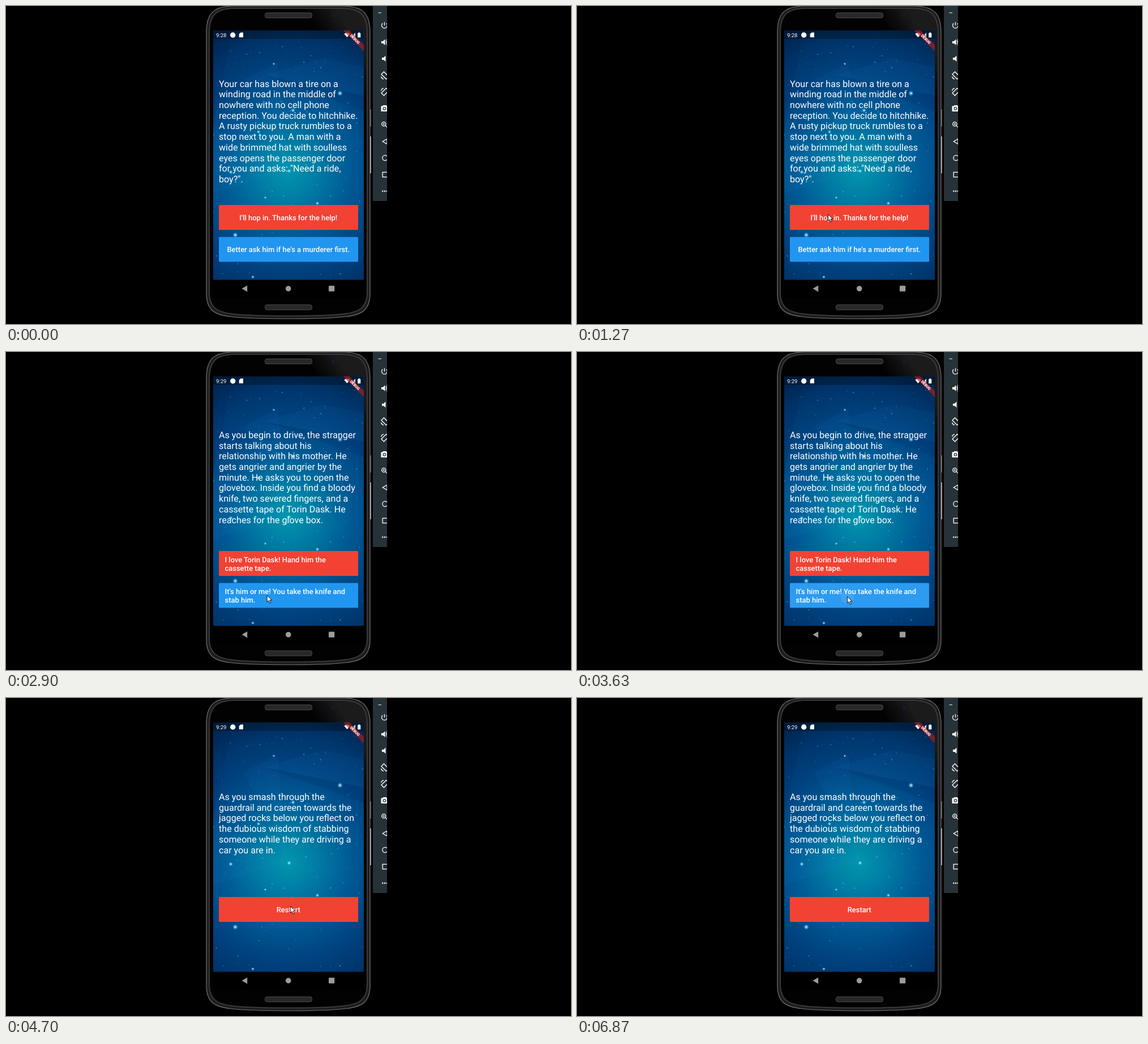
Animation, 998 px wide and 561 px high, one loop 7730 ms. Source, as an HTML page:

```html
<!DOCTYPE html>
<html lang="en">
<head>
<meta charset="utf-8">
<title>Hitchhiker story</title>
<style>
  html, body { margin: 0; width: 100%; height: 100%; overflow: hidden; background: #000; }
  svg { display: block; width: 100vw; height: 100vh; }
  text { font-family: Roboto, Arial, sans-serif; fill: #fff; text-rendering: geometricPrecision; }
  .story { font-size: 16.1px; }
  .label { font-size: 12.93px; font-weight: 500; }
  .mid { text-anchor: middle; }
  .clock { font-size: 9.5px; }
  .banner { font-size: 6.6px; font-weight: 900; }
  .red { fill: #f24233; }
  .blue { fill: #2196f0; }
  .icon { fill: none; stroke: #fff; stroke-width: 1.3; }
  .solid { fill: #fff; }

  .s1, .s2, .s3, .am, .pm, .press { animation: 7.73s step-end infinite; }
  .s1 { animation-name: first; }
  .s2 { animation-name: second; }
  .s3 { animation-name: third; }
  .am { animation-name: before; }
  .pm { animation-name: after; }
  .press { animation-name: press; }
  .splash { animation: splash 7.73s linear infinite; transform-box: fill-box; transform-origin: center; }
  .cursor { animation: cursor 7.73s step-end infinite; }

  /* 1830 ms: second screen, 3770 ms: third screen */
  @keyframes first { 0% { visibility: visible } 23.67%, 100% { visibility: hidden } }
  @keyframes second {
    0% { visibility: hidden } 23.67% { visibility: visible } 48.77%, 100% { visibility: hidden }
  }
  @keyframes third { 0% { visibility: hidden } 48.77%, 100% { visibility: visible } }
  @keyframes before { 0% { visibility: visible } 36.22%, 100% { visibility: hidden } }
  @keyframes after { 0% { visibility: hidden } 36.22%, 100% { visibility: visible } }
  @keyframes press { 0% { visibility: hidden } 46.9% { visibility: visible } 48.77%, 100% { visibility: hidden } }
  @keyframes splash {
    0%, 20.69% { opacity: 0; transform: scale(.1) }
    20.7% { opacity: .2; transform: scale(.1) }
    23.67% { opacity: .16; transform: scale(.8) }
    26.3% { opacity: .02; transform: scale(1) }
    28.8%, 100% { opacity: 0; transform: scale(1) }
  }
  @keyframes cursor {
    0% { opacity: 0; transform: translate(376px, 410px) }
    11.64% { opacity: 1; transform: translate(376px, 410px); animation-timing-function: steps(4) }
    16.4% { opacity: 1; transform: translate(443px, 367px) }
    26.2% { opacity: 1; transform: translate(436px, 426px) }
    30.66% { opacity: 1; transform: translate(436px, 426px); animation-timing-function: steps(10) }
    40.49% { opacity: 1; transform: translate(477px, 431px) }
    50.5% { opacity: 1; transform: translate(477px, 431px); animation-timing-function: steps(7) }
    57.83% { opacity: 1; transform: translate(502px, 367px) }
    61.6% { opacity: 1; transform: translate(502px, 367px); animation-timing-function: steps(8) }
    68.56% { opacity: 1; transform: translate(560px, -20px) }
    69%, 100% { opacity: 0; transform: translate(560px, -20px) }
  }
</style>
</head>
<body>
<svg viewBox="0 0 998 561" preserveAspectRatio="none">
  <defs>
    <radialGradient id="sky" gradientUnits="userSpaceOnUse" cx="497" cy="290" r="268">
      <stop offset="0" stop-color="#0296ad"/>
      <stop offset=".18" stop-color="#017ea5"/>
      <stop offset=".42" stop-color="#005a95"/>
      <stop offset=".65" stop-color="#00427f"/>
      <stop offset=".85" stop-color="#00356b"/>
      <stop offset="1" stop-color="#002650"/>
    </radialGradient>
    <radialGradient id="glow">
      <stop offset="0" stop-color="#fff"/>
      <stop offset=".3" stop-color="#9fe4ff" stop-opacity=".75"/>
      <stop offset="1" stop-color="#3fb4ee" stop-opacity="0"/>
    </radialGradient>
    <linearGradient id="sheen" x1=".8" y1="0" x2=".72" y2=".1">
      <stop offset="0" stop-color="#1b1b1c"/>
      <stop offset="1" stop-color="#020202"/>
    </linearGradient>
    <pattern id="mesh" width="3" height="3" patternUnits="userSpaceOnUse">
      <rect width="3" height="3" fill="#242425"/><circle cx="1.5" cy="1.5" r=".8" fill="#38383a"/>
    </pattern>
    <clipPath id="screen"><rect x="366" y="43" width="266" height="440"/></clipPath>
    <clipPath id="redClip"><rect x="376" y="351" width="246" height="44" rx="1.5"/></clipPath>
    <clipPath id="bar"><rect x="648" width="25" height="344"/></clipPath>
  </defs>

  <!-- phone body -->
  <path d="M354 46C354 12 368 1 400 0H597C629 1 643 12 643 46V507C643 536 629 545 600 548C560 553 437 553 397 548C368 545 354 536 354 507Z" fill="#1c1c1d" stroke="#74747c" stroke-width="1.200"/>
  <path d="M359 48C359 15 372 5 402 4H595C625 5 638 15 638 48V505C638 531 625 540 598 543C560 548 437 548 399 543C372 540 359 531 359 505Z" fill="url(#sheen)" stroke="#39393a" stroke-width="2"/>
  <rect x="366" y="43" width="266" height="472"/>
  <g fill="url(#mesh)" stroke="#4a4a4c">
    <rect x="457.500" y="12" width="83" height="9" rx="3.500"/>
    <rect x="457.500" y="527" width="83" height="9" rx="3.500"/>
  </g>
  <circle cx="578" cy="17" r="3" fill="#171b2b"/>
  <path d="M644 183V213" stroke="#a5a5a9" stroke-width="2" stroke-dasharray="1 1"/>
  <path d="M644 230V295" stroke="#a0a0a5" stroke-width="2"/>

  <!-- wallpaper -->
  <g clip-path="url(#screen)">
    <rect x="366" y="43" width="266" height="440" fill="url(#sky)"/>
    <g fill="#2a9ee0" fill-opacity=".05">
      <path d="M455 122L560 92L632 108V158Z"/>
      <path d="M497 290L420 130L480 100Z"/>
      <path d="M497 290L366 215V330Z"/>
    </g>
    <g fill="#001c48" fill-opacity=".1">
      <path d="M455 122L632 158V185L540 152Z"/>
      <path d="M366 43H400L366 215Z"/>
    </g>
    <g id="stars"></g>
    <rect x="366" y="43" width="266" height="15" fill="#000" fill-opacity=".27"/>
  </g>

  <!-- status bar -->
  <text class="clock am" x="371" y="54.600">9:28</text>
  <text class="clock pm" x="371" y="54.600">9:29</text>
  <circle class="solid" cx="400.700" cy="51.200" r="4.700"/>
  <g class="solid">
    <path d="M414.500 46.800H419V55.300H411.700V49.600Z"/>
    <path d="M597.300 49.200Q602.500 44.700 607.700 49.200L602.500 55.300Z"/>
    <path d="M617 47V55.300H609.500Z" fill-opacity=".85"/>
    <path d="M622.500 46.700H625V47.700H626.300V55.400H621.200V47.700H622.500Z"/>
  </g>
  <g clip-path="url(#screen)">
    <g transform="translate(616.450 58.550) rotate(45)">
      <rect x="-30" y="-3.900" width="60" height="7.800" fill="#b71c1c" fill-opacity=".66"/>
      <text class="banner mid" y="2.400">DEBUG</text>
    </g>
  </g>

  <!-- buttons -->
  <rect class="red" x="376" y="351" width="246" height="44" rx="1.500"/>
  <g clip-path="url(#redClip)"><circle class="splash" cx="443" cy="372" r="190" fill="#fff" opacity="0"/></g>
  <g class="s1"><rect class="blue" x="376" y="407.500" width="246" height="43.700" rx="1.500"/></g>
  <g class="s2"><rect class="blue" x="376" y="407.500" width="246" height="43.700" rx="1.500"/></g>
  <g class="press" fill="#fff">
    <rect x="376" y="407.500" width="246" height="43.700" rx="1.500" fill-opacity=".05"/>
    <circle cx="478" cy="432" r="12" fill-opacity=".09"/>
  </g>
  <g id="texts"></g>

  <!-- navigation bar -->
  <g fill="#9c9c9c">
    <path d="M426.200 493V504.200L416.600 498.600Z"/>
    <circle cx="498.700" cy="498.600" r="4.800"/>
    <rect x="570" y="493.600" width="10.200" height="10" rx="1"/>
  </g>

  <!-- emulator tools -->
  <rect x="648" width="25" height="344" fill="#263238"/>
  <g class="icon" clip-path="url(#bar)">
    <path d="M657.500 12H663" stroke-width="1"/>
    <path d="M668.500 28.500V34.500M665.200 30.600A4.900 4.900 0 1 0 671.800 30.600"/>
    <path class="solid" stroke="none" d="M663 62H666L669.500 58.500V69L666 66H663ZM664 91H667L670.500 87.500V98L667 95H664Z"/>
    <path d="M671 60.500Q673.500 63.800 671 67M672.500 58Q676 63.500 672.500 69.500"/>
    <path d="M663 120.500L667.500 116L676 124.500L671.500 129ZM662.500 124.500Q663.500 128 667 128.800"/>
    <path d="M663 153.500L671.500 145L676 149.500L667.500 158ZM662.500 149.500Q663.500 145.800 667 145.200"/>
    <path class="solid" stroke="none" d="M662.500 176.500H665.300L666.500 175H671.500L672.500 176.500H675V186H662.500Z"/>
    <circle cx="668.500" cy="181" r="2.300" stroke="#263238"/>
    <circle cx="667.300" cy="208.200" r="3.600"/>
    <path d="M670 211L674 215M665.500 208.200H669.200M667.300 206.400V210" stroke-width="1.100"/>
    <path d="M673 234.500V243.500L665.300 239Z"/>
    <circle cx="669.500" cy="268" r="4.600"/>
    <rect x="665.200" y="293.300" width="9" height="8.400"/>
    <path class="solid" stroke="none" d="M664.300 325.500h2.200v2.200h-2.200zM668 325.500h2.200v2.200h-2.200zM671.700 325.500h2.200v2.200h-2.200z"/>
  </g>

  <path class="cursor" d="M.5 .5V12L3.200 9.500L5.200 14L7.200 13.100L5.200 8.800H9Z" fill="#fff" stroke="#000" stroke-width=".9"/>
</svg>

<script>
  const NS = 'http://www.w3.org/2000/svg';

  function add(parent, tag, attrs, content) {
    const el = document.createElementNS(NS, tag);
    for (const key in attrs) el.setAttribute(key, attrs[key]);
    if (content) el.textContent = content;
    parent.appendChild(el);
    return el;
  }

  const screens = [
    {
      story: ['Your car has blown a tire on a', 'winding road in the middle of', 'nowhere with no cell phone',
        'reception. You decide to hitchhike.', 'A rusty pickup truck rumbles to a', 'stop next to you. A man with a',
        'wide brimmed hat with soulless', 'eyes opens the passenger door', 'for you and asks: "Need a ride,', 'boy?".'],
      labels: [["I'll hop in. Thanks for the help!"], ["Better ask him if he's a murderer first."]]
    },
    {
      story: ['As you begin to drive, the stranger', 'starts talking about his', 'relationship with his mother. He',
        'gets angrier and angrier by the', 'minute. He asks you to open the', 'glovebox. Inside you find a bloody',
        'knife, two severed fingers, and a', 'cassette tape of Torin Dask. He', 'reaches for the glove box.'],
      labels: [['I love Torin Dask! Hand him the', 'cassette tape.'], ["It's him or me! You take the knife and", 'stab him.']]
    },
    {
      story: ['As you smash through the', 'guardrail and careen towards the', 'jagged rocks below you reflect on',
        'the dubious wisdom of stabbing', 'someone while they are driving a', 'car you are in.'],
      labels: [['Restart']]
    }
  ];

  const LEAD = 18.68, LABEL_LEAD = 15;
  const texts = document.getElementById('texts');
  screens.forEach((screen, n) => {
    const group = add(texts, 'g', { class: 's' + (n + 1) });
    const top = 226.8 - (screen.story.length - 1) * LEAD / 2;
    screen.story.forEach((line, i) =>
      add(group, 'text', { class: 'story', x: 376, y: top + i * LEAD }, line));
    screen.labels.forEach((lines, b) => {
      const single = lines.length === 1;
      const base = 378 + b * 56.3 - (lines.length - 1) * LABEL_LEAD / 2;
      lines.forEach((line, i) => add(group, 'text', {
        class: single ? 'label mid' : 'label',
        x: single ? 498.8 : 386.5,
        y: base + i * LABEL_LEAD
      }, line));
    });
  });

  let seed = 41;
  const random = () => (seed = seed * 16807 % 2147483647) / 2147483647;
  const stars = document.getElementById('stars');
  for (let i = 0; i < 260; i++) {
    add(stars, 'circle', {
      cx: 366 + random() * 266, cy: 62 + random() * 420,
      r: 0.5 + random() ** 3 * 0.9, fill: '#3fb2e6', opacity: 0.2 + random() * 0.5
    });
  }
  const bright = [[590, 154, 5], [405, 404, 5], [507, 184, 4], [397, 293, 4], [500, 291, 4], [550, 348, 3.5],
    [473, 102, 2.5], [446, 222, 3.5], [436, 478, 3], [458, 338, 2.5]];
  for (const [cx, cy, r] of bright) add(stars, 'circle', { cx, cy, r, fill: 'url(#glow)' });
</script>
</body>
</html>
```
